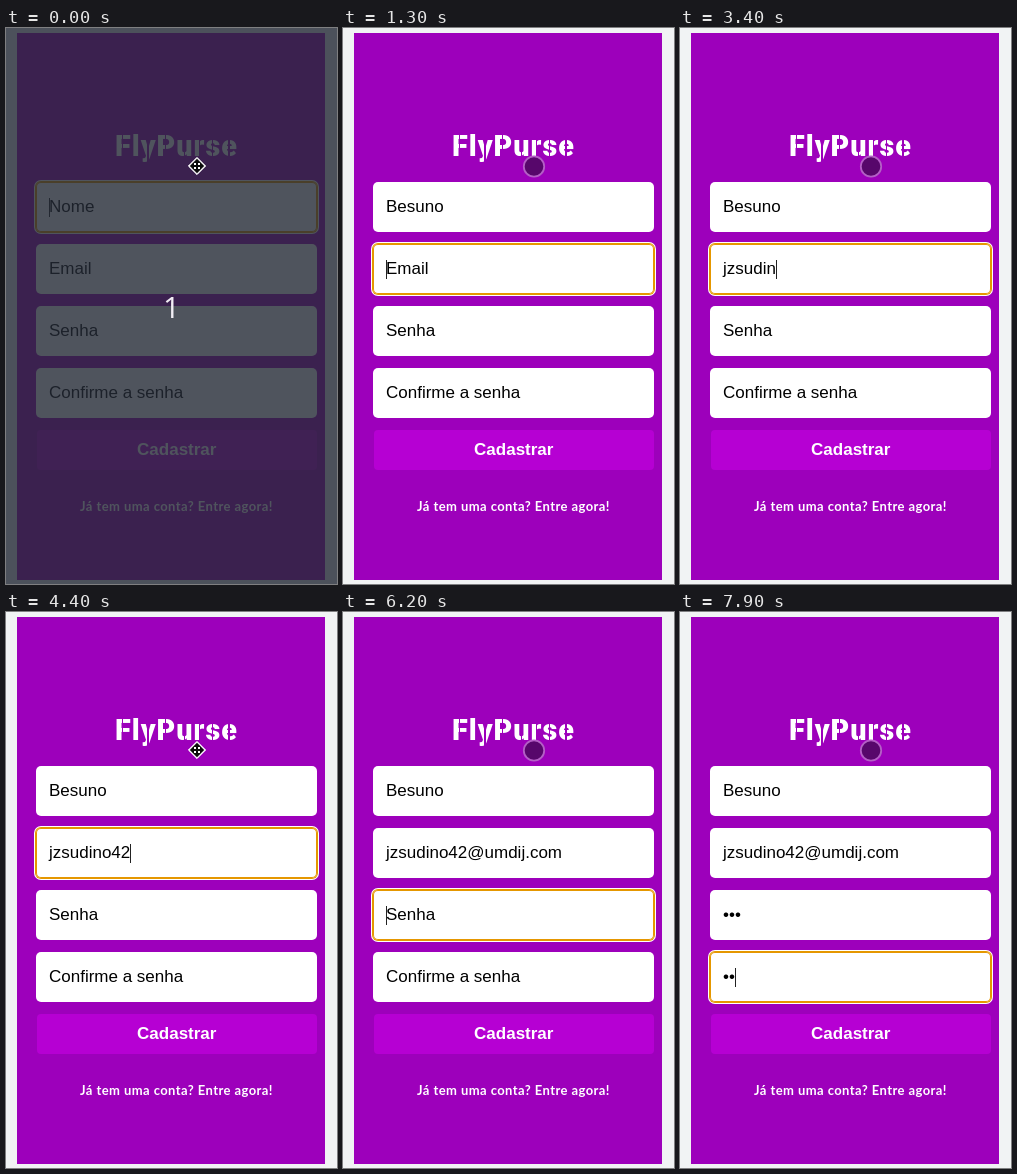
An HTML page that plays this animation: 331x556 px, repeating every 8000 ms.

```html
<!DOCTYPE html>
<html lang="pt">
<head>
<meta charset="utf-8">
<title>Cadastro</title>
<style>
  html, body { margin: 0; width: 100%; height: 100%; overflow: hidden; background: #f1f3f4; }
  #stage { --purple: #9d00bb; position: relative; width: 331px; height: 556px; overflow: hidden; }
  #stage div, #stage svg { position: absolute; }
  #phone { left: 11px; top: 5px; width: 308px; height: 547px; background: var(--purple); }
  #title {
    left: 0; top: 98px; width: 340px; text-align: center; color: #fff; white-space: nowrap;
    font: 900 28.8px/40px Roboto, "Open Sans", sans-serif;
  }
  #title span { position: relative; display: inline-block; margin: 0 .5px; }
  /* Stencil cut through every letter but the thin one */
  #title span:not(:nth-child(2))::after {
    content: ""; position: absolute; inset: 6px auto 2px 45%; width: 1.2px; background: var(--purple);
  }
  .field {
    left: 30px; width: 281px; height: 50px; border-radius: 5px; background: #fff; color: #000;
    font: 17px/49px "Liberation Sans", Arial, sans-serif; white-space: pre; text-indent: 13px;
  }
  .focus { box-shadow: inset 0 0 0 1px #e59700, 0 0 0 1px #e59700, 0 0 0 2px #fff; }
  .field i { position: absolute; top: 16px; width: 1px; height: 19px; background: #222; }
  #button {
    left: 30.5px; top: 402px; width: 280.5px; height: 39.5px; border-radius: 4px; background: #b600d3; color: #fff;
    font: bold 17px/39px "Liberation Sans", Arial, sans-serif; text-align: center;
  }
  #link {
    left: 0; top: 468px; width: 341px; color: #fff; text-align: center; white-space: nowrap;
    font: bold 13px/21px Lato, "Open Sans", sans-serif; letter-spacing: .43px;
  }
  #shade { inset: 0; background: rgba(36, 42, 53, .8); }
  #count {
    left: 0; top: 258px; width: 331px; color: #f2eef5; text-align: center;
    font: 30px/42px "Open Sans", "Noto Sans", sans-serif;
  }
  #stage svg { left: 178.5px; top: 126px; }
</style>
</head>
<body>
<div id="stage">
  <div id="phone"></div>
  <div id="title"></div>
  <div id="button">Cadastrar</div>
  <div id="link">Já tem uma conta? Entre agora!</div>
  <div id="shade"><div id="count">1</div></div>
  <svg id="touch" width="24" height="25" viewBox="-12 -12.5 24 25">
    <circle r="10.2" fill="#57076b" stroke="#b45fc6" stroke-width="1.8"/>
  </svg>
  <svg id="pinch" width="24" height="25" viewBox="-12 -12 24 25">
    <path d="M0-8.6 8.6 0 0 8.6-8.6 0Z" fill="#fff" stroke="#fff" stroke-linejoin="round"/>
    <path d="M0-7.2 7.2 0 0 7.2-7.2 0Z" fill="#0a0a0a"/>
    <path d="M-3-3h2v2h-2ZM1-3h2v2h-2ZM-3 1h2v2h-2ZM1 1h2v2h-2Z" fill="#fff"/>
  </svg>
</div>
<script>
const LOOP = 8000, TICK = 100, KEY = 50, BLINK = 500;
const $ = id => document.getElementById(id);
const show = (el, on) => { el.style.visibility = on ? "visible" : "hidden"; };

function add(parent, tag, text = "") {
  const el = document.createElement(tag);
  el.textContent = text;
  return parent.appendChild(el);
}

for (const letter of "FlyPurse") add($("title"), "span", letter);

// Bursts of typing by start time; keys within a burst follow at a steady pace.
const inputs = [
  { hint: "Nome", focus: -300, bursts: { 350: "Be", 800: "s", 1000: "uno" } },
  { hint: "Email", focus: 1300, bursts: {
    2000: "jz", 2200: "s", 2650: "ud", 3350: "in", 4000: "o42",
    4500: "@", 4900: "um", 5200: "dij", 5700: ".com"
  } },
  { hint: "Senha", focus: 6200, bursts: { 6700: "••", 7000: "•" } },
  { hint: "Confirme a senha", focus: 7300, bursts: { 7700: "•", 7900: "•" } }
];

inputs.forEach((input, i) => {
  const box = add($("stage"), "div");
  box.className = "field";
  box.style.top = 154 + i * 62 + "px";
  input.box = box;
  input.text = add(box, "span");
  input.caret = add(box, "i");
  input.label = add(box, "span");
  $("shade").before(box);
});

// Text typed so far, and the time of the latest key.
function typing({ focus, bursts }, t) {
  let text = "", last = focus;
  for (const [at, chunk] of Object.entries(bursts)) {
    const keys = Math.min(chunk.length, Math.floor((t - at) / KEY) + 1);
    if (keys < 1) break;
    text += chunk.slice(0, keys);
    last = +at + (keys - 1) * KEY;
  }
  return { text, last: Math.ceil(last / TICK) * TICK };
}

function draw(t) {
  const active = inputs.findLast(input => input.focus <= t);
  const shift = t < 400 || (t >= 4400 && t < 4900);
  show($("shade"), t < 200);
  show($("pinch"), shift);
  show($("touch"), !shift);
  for (const input of inputs) {
    const { text, last } = typing(input, t);
    const focused = input === active;
    input.text.textContent = text;
    input.label.textContent = text ? "" : input.hint;
    input.box.classList.toggle("focus", focused);
    show(input.caret, focused && Math.floor((t - last) / BLINK) % 2 === 0);
  }
}

const start = performance.now();
let shown;
function frame() {
  const t = Math.floor((performance.now() - start) % LOOP / TICK) * TICK;
  if (t !== shown) draw(shown = t);
  requestAnimationFrame(frame);
}
frame();
</script>
</body>
</html>
```
